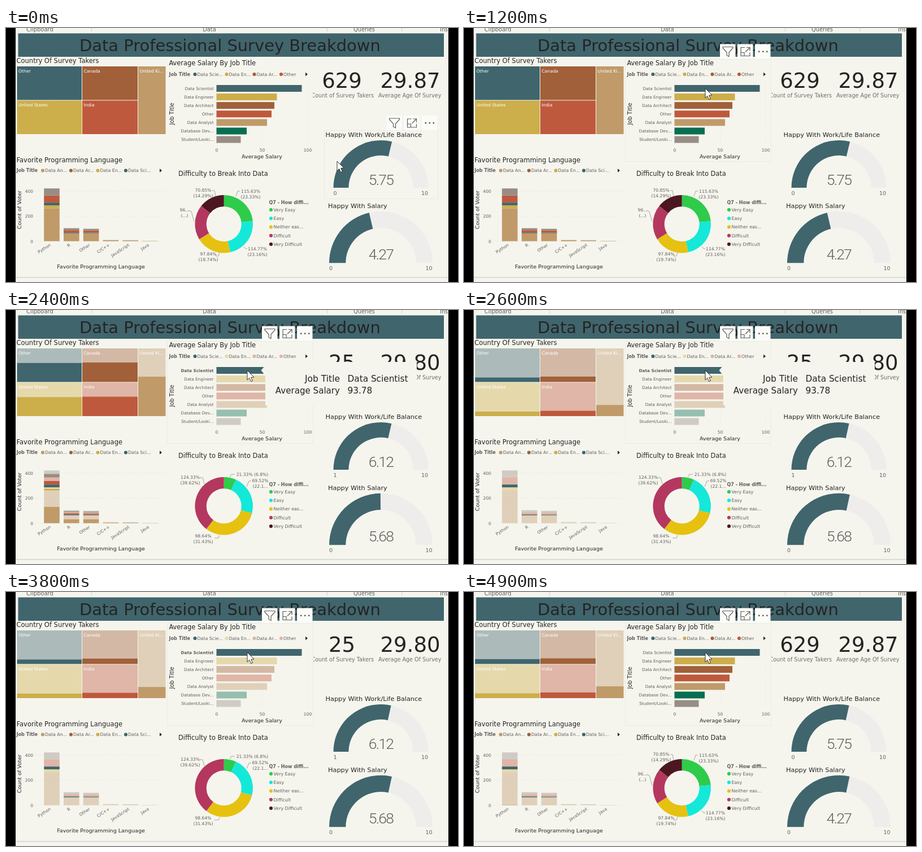
These frames come from a looping animation (800 by 450 pixels, 5 s). An HTML page with a canvas:

```html
<!DOCTYPE html>
<html lang="en">
<head>
<meta charset="utf-8">
<title>Survey dashboard</title>
<style>
html, body { margin: 0; width: 100%; height: 100%; overflow: hidden; background: #000; }
canvas { display: block; }
</style>
</head>
<body>
<canvas id="stage" width="800" height="450"></canvas>
<script>
const ctx = document.getElementById('stage').getContext('2d');
const LOOP = 5000, STEP = 100;
const SELECT = 2300, DESELECT = 4800, TIP_IN = 1500, TIP_OUT = 3000;
const PAPER = '#f5f5ee', INK = '#252423', SOFT = '#605e5c';
const TEAL = '#40656d', GOLD = '#ccae4a', BROWN = '#a16039', RED = '#bf593d',
  TAN = '#c09a69', GREEN = '#086e52', GREY = '#988d84';
const RING = ['#2fcb4b', '#14e8d9', '#e6c110', '#b43760', '#4c1720'];

const clamp = x => Math.min(1, Math.max(0, x));
const ease = x => (x = clamp(x), x * x * (3 - 2 * x));
const mix = (a, b, k) => a + (b - a) * k;

function rect(x, y, w, h, color, alpha = 1) {
  ctx.globalAlpha = alpha;
  ctx.fillStyle = color;
  ctx.fillRect(x, y, w, h);
  ctx.globalAlpha = 1;
}

// y is the middle of the capital letters
function text(str, x, y, size, { color = INK, align = 'left', weight = 400, font = '"DejaVu Sans", Verdana, sans-serif', angle = 0, spacing = 0 } = {}) {
  ctx.save();
  ctx.translate(x, y);
  ctx.rotate(angle);
  ctx.font = `${weight} ${size}px ${font}`;
  ctx.letterSpacing = spacing + 'px';
  ctx.textAlign = align;
  ctx.fillStyle = color;
  ctx.fillText(str, 0, size * 0.365);
  ctx.restore();
}

const heading = (str, x, y, size = 11.4) => text(str, x, y, size);

function path(points, { fill, stroke, width = 1, close = false }) {
  ctx.beginPath();
  points.forEach(([x, y]) => ctx.lineTo(x, y));
  if (close) ctx.closePath();
  if (fill) { ctx.fillStyle = fill; ctx.fill(); }
  if (stroke) { ctx.strokeStyle = stroke; ctx.lineWidth = width; ctx.stroke(); }
}

function dot(x, y, color, alpha = 1) {
  ctx.globalAlpha = alpha;
  ctx.fillStyle = color;
  ctx.beginPath();
  ctx.arc(x, y, 3.1, 0, 7);
  ctx.fill();
  ctx.globalAlpha = 1;
}

function sector(x, y, outer, inner, from, to, color) {
  ctx.fillStyle = color;
  ctx.beginPath();
  ctx.arc(x, y, outer, from, to);
  ctx.arc(x, y, inner, to, from, true);
  ctx.fill();
}

function gridLine(x1, y1, x2, y2) {
  ctx.setLineDash([1, 3]);
  path([[x1, y1], [x2, y2]], { stroke: '#dfdfd8' });
  ctx.setLineDash([]);
}

function legend(x, y, arrowX, items, alphaOf) {
  text('Job Title', x, y, 8.1, { weight: 700, color: SOFT });
  items.forEach(([name, color, dx], i) => {
    dot(x + dx, y, color, alphaOf(i));
    text(name, x + dx + 4, y, 7.9, { color: SOFT });
  });
  path([[arrowX, y - 3.2], [arrowX + 4, y], [arrowX, y + 3.2]], { fill: INK });
}

function drawHeader() {
  const ribbon = { color: SOFT, align: 'center' };
  text('Clipboard', 60, 2, 10, ribbon);
  text('Data', 360, 2, 9.8, ribbon);
  text('Queries', 634, 2, 9.8, ribbon);
  text('Insert', 768, 2, 9.8, { color: SOFT });
  for (const x of [151, 568, 700]) rect(x, 0, 1, 6, '#d2d0cd');
  rect(21.5, 9.5, 753.5, 41.5, TEAL);
  text('Data Professional Survey Breakdown', 130, 30.2, 28.95);
  rect(17, 441, 766, 2, '#dcdcd6');
}

function drawTreemap(s) {
  heading('Country Of Survey Takers', 18.5, 58.3, 11.5);
  const tiles = [
    ['Other', 19.5, 68, 114.5, 59.5, TEAL, .135], ['United States', 19.5, 128.5, 114.5, 59.5, GOLD, .135],
    ['Canada', 135, 68, 98, 59.5, BROWN, .16], ['India', 135, 128.5, 98, 59.5, RED, .16],
    ['United Ki...', 234, 68, 48.5, 120, TAN, .165]
  ];
  for (const [name, x, y, w, h, color, part] of tiles) {
    const lit = h * mix(1, part, s);
    rect(x, y, w, h - lit, color, .4);
    rect(x, y + h - lit, w, lit, color);
    text(name, x + 2.5, y + 8, 7.7, { color: '#fff' });
  }
}

function drawSalaryBars(selected) {
  heading('Average Salary By Job Title', 288.5, 62.3);
  const fade = i => selected && i ? .4 : 1;
  legend(288.5, 82, 530, [['Data Scie...', TEAL, 46], ['Data En...', GOLD, 102], ['Data Ar...', BROWN, 151], ['Other', RED, 198.5]], fade);
  [0, 50, 100].forEach((n, i) => {
    const x = 373 + i * 80.5;
    gridLine(x, 96, x, 207);
    text(n, x, 216, 7.5, { color: SOFT, align: 'center' });
  });
  const bars = [
    ['Data Scientist', 151, TEAL], ['Data Engineer', 107, GOLD], ['Data Architect', 102.5, BROWN],
    ['Other', 97.5, RED], ['Data Analyst', 89.5, TAN], ['Database Dev...', 53.5, GREEN], ['Student/Looki...', 43, GREY]
  ];
  bars.forEach(([name, w, color], i) => {
    const y = 107 + i * 15.1;
    rect(372.5, y - 6, w, 12, color, fade(i));
    text(name, 367.5, y, 7.3, { color: SOFT, align: 'right', weight: selected && !i ? 700 : 400 });
  });
  text('Average Salary', 453, 228, 9.5, { align: 'center' });
  text('Job Title', 293.5, 152, 9.8, { align: 'center', angle: -Math.PI / 2 });
}

function drawLanguages(s) {
  heading('Favorite Programming Language', 18.5, 233.5, 11.5);
  legend(18.5, 252.5, 272, [['Data An...', TAN, 46.5], ['Data Ar...', BROWN, 96.5], ['Data En...', GOLD, 144], ['Data Sci...', TEAL, 193.5]], () => 1);
  [400, 200, 0].forEach((n, i) => {
    const y = 289 + i * 44.5;
    gridLine(52, y, 281, y);
    text(n, 48, y, 7.5, { color: SOFT, align: 'right' });
  });
  // segment heights from the bottom up
  const columns = [
    ['Python', [TAN, 58], [GOLD, 5.5], [TEAL, 5], [RED, 12.5], [GREY, 12.5]],
    ['R', [TAN, 14], [TEAL, 1.5], [RED, 4], [GREY, 3.5]],
    ['Other', [TAN, 14], [TEAL, 1.2], [RED, 3.8], [GREY, 3]],
    ['C/C++', [TAN, 2]],
    ['JavaScript', [TAN, 1.3], [GREY, .5]],
    ['Java', [TAN, .6]]
  ];
  columns.forEach(([name, ...parts], i) => {
    const x = 67.2 + i * 34.8;
    let y = 377.7;
    for (const [color, h] of parts) {
      const lit = h * (color === TEAL ? 1 : 1 - s);
      y -= h;
      rect(x, y, 27.6, h - lit, color, .4);
      rect(x, y + h - lit, 27.6, lit, color);
    }
    text(name, x + 11, 383.5, 7.4, { color: SOFT, align: 'right', angle: -.58 });
  });
  text('Favorite Programming Language', 168, 422.5, 9.55, { align: 'center' });
  text('Count of Voter', 24, 322, 9.5, { align: 'center', angle: -Math.PI / 2 });
}

// label: lines, centre x, first line y, leader points
const DONUT = {
  all: {
    shares: [23.33, 23.16, 19.74, 19.48, 14.29],
    labels: [
      ['115.63%|(23.33%)', 433, 289, [[407, 298], [410, 289], [414, 289]]],
      ['114.77%|(23.16%)', 445, 391, [[421, 387], [424, 391], [427, 391]]],
      ['97.84%|(19.74%)', 358, 400, [[378, 398], [376, 404], [371, 404]]],
      ['96...|(...)', 316, 322, [[333, 343], [328, 325], [323, 323]]],
      ['70.85%|(14.29%)', 349, 287, [[371, 298], [369, 288], [365, 288]]]
    ]
  },
  picked: {
    shares: [6.8, 22.15, 31.43, 39.62, 0],
    labels: [
      ['21.33% (6.8%)', 436, 291, [[396, 296], [399, 291], [405, 291]]],
      ['69.52%|(22.1...', 450, 302, [[426, 313], [430, 303], [434, 303]]],
      ['98.64%|(31.43%)', 349, 400, [[378, 399], [376, 404], [369, 404]]],
      ['124.33%|(39.62%)', 326, 296, [[351, 308], [348, 297], [343, 297]]]
    ]
  }
};

function drawDonut(selected) {
  heading('Difficulty to Break Into Data', 305, 257.5);
  const { shares, labels } = selected ? DONUT.picked : DONUT.all;
  let angle = -Math.PI / 2;
  shares.forEach((share, i) => {
    const end = angle + share / 50 * Math.PI;
    if (share) sector(385.7, 347.3, 51.3, 31, angle, end, RING[i]);
    angle = end;
  });
  for (const [lines, x, y, leader] of labels) {
    path(leader, { stroke: '#a6a5a1' });
    lines.split('|').forEach((line, i) => text(line, x, y + i * 10, 7.6, { color: SOFT, align: 'center' }));
  }
  text('Q7 - How diffi...', 465.5, 309, 8, { weight: 700, color: SOFT });
  ['Very Easy', 'Easy', 'Neither eas...', 'Difficult', 'Very Difficult'].forEach((name, i) => {
    const y = 322 + i * 15.25;
    dot(469, y, RING[i]);
    text(name, 473.5, y, 7.9, { color: SOFT });
  });
}

function drawGauge(title, titleX, titleY, baseY, r, share, value, min) {
  const x = 663.5, mid = Math.PI * (1 + share);
  heading(title, titleX, titleY, 11.3);
  sector(x, baseY, r, r * .68, Math.PI, 2 * Math.PI, '#eeedec');
  sector(x, baseY, r, r * .68, Math.PI, mid, TEAL);
  text(value, x, baseY - r * .175, 26.5, { color: SOFT, align: 'center', weight: 300, font: 'Roboto, sans-serif', spacing: -1.7 });
  text(min, x - r, baseY + 9.5, 9.5, { color: SOFT });
  text('10', x + r - .5, baseY + 9.5, 9.5, { color: SOFT, align: 'right' });
}

function drawCards(selected) {
  text(selected ? '25' : '629', 594.5, 92.8, 37, { align: 'center' });
  text(selected ? '29.80' : '29.87', 715.5, 92.8, 37, { align: 'center' });
  ctx.save();
  ctx.beginPath();
  ctx.rect(543, 100, 240, 40);
  ctx.clip();
  text('Count of Survey Takers', 651, 119.3, 9.6, { color: '#706e6b', align: 'right' });
  ctx.restore();
  text('Average Age Of Survey', 659, 119.3, 9.6, { color: '#706e6b' });
}

function drawCardFrame(x, y, w, h) {
  ctx.strokeStyle = '#ebebe5';
  ctx.lineWidth = 1;
  ctx.strokeRect(x + .5, y + .5, w, h);
}

function drawToolbar(x, y) {
  for (const dx of [0, 31, 62]) rect(x + dx, y, 27.5, 26.5, '#fbfbf8');
  const line = { stroke: SOFT, width: 1.2 };
  const at = (points, dx) => points.map(([px, py]) => [x + dx + px, y + py]);
  path(at([[5, 5], [23, 5], [23, 7], [16, 14.5], [16, 22], [12, 20], [12, 14.5], [5, 7]], 0), { ...line, close: true });
  path(at([[13, 6], [6, 6], [6, 21], [22, 21], [22, 15]], 31), line);
  path(at([[16, 6], [22, 6], [22, 12]], 31), line);
  path(at([[22, 6], [14, 14]], 31), line);
  path(at([[6, 15], [12, 15], [12, 21]], 31), line);
  for (const dx of [6, 13, 20]) rect(x + 62 + dx, y + 12, 2.5, 2.5, SOFT);
}

function drawTooltip() {
  path([[459, 92], [727, 92], [727, 169], [459, 169], [459, 116], [451.5, 107], [459, 98]], { fill: PAPER, close: true });
  text('Job Title', 591, 121.5, 15.5, { align: 'right' });
  text('Average Salary', 591, 142, 15.1, { align: 'right' });
  text('Data Scientist', 604.5, 121.5, 15.3);
  text('93.78', 604.5, 142, 15.3);
}

function drawCursor(x, y) {
  const arrow = [[0, 0], [0, 17], [3.8, 13.4], [6.6, 19.6], [9.4, 18.3], [6.7, 12.3], [12, 12.1]];
  path(arrow.map(([px, py]) => [x + px, y + py]), { fill: '#fff', stroke: '#333', close: true });
}

function draw(t) {
  const selected = t >= SELECT && t < DESELECT;
  const s = t < DESELECT ? ease((t - SELECT + 100) / 400) : 1 - ease((t - DESELECT - 50) / 800);
  const glide = ease(t / 600), settle = ease((t - 600) / 300);
  const mx = mix(586, 429, glide) - 2 * settle, my = mix(236, 114, glide) - 7 * settle;

  rect(0, 0, 800, 450, PAPER);
  drawHeader();
  drawTreemap(s);
  drawSalaryBars(selected);
  drawLanguages(s);
  drawDonut(selected);
  drawCards(selected);
  drawGauge('Happy With Work/Life Balance', 565.5, 189, 283, 84, mix(.575, .569, s), selected ? '6.12' : '5.75', selected ? '1' : '0');
  drawGauge('Happy With Salary', 570, 315.3, 416.3, 91.5, mix(.427, .568, s), selected ? '5.68' : '4.27', '0');

  if (mx > 563) {
    drawCardFrame(563, 181, 201, 121);
    drawToolbar(673.5, 155);
  } else if (mx < 543) {
    drawCardFrame(285, 55, 258, 181);
    drawToolbar(453, 28.5);
  }
  if (t >= TIP_IN && t < TIP_OUT) drawTooltip();
  drawCursor(mx, my);
  rect(0, 0, 17, 450, '#000');
  rect(783, 0, 17, 450, '#000');
}

const start = performance.now();
function tick() {
  const t = (performance.now() - start) % LOOP;
  draw(Math.floor(t / STEP) * STEP);
  requestAnimationFrame(tick);
}
tick();
</script>
</body>
</html>
```
